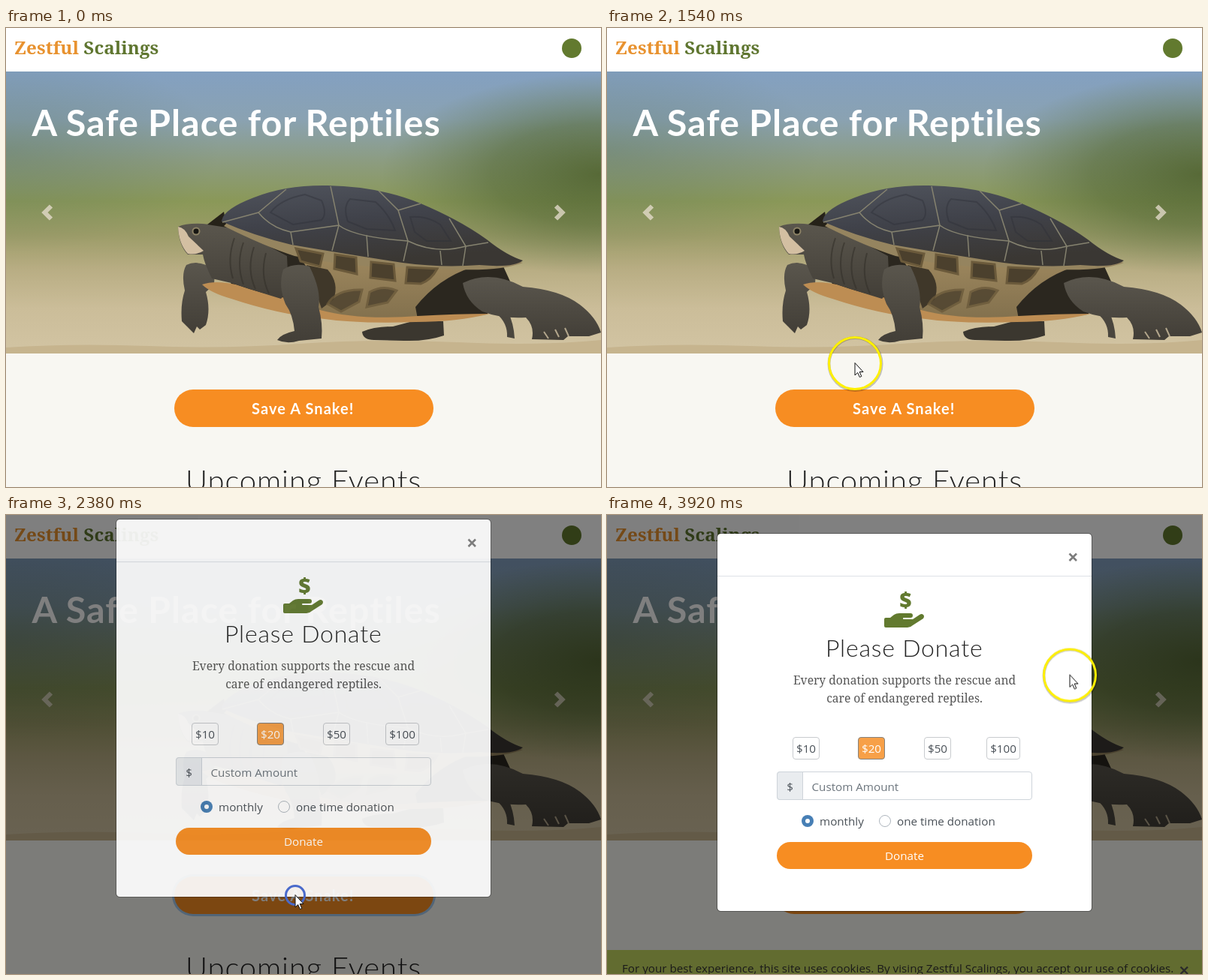
These frames come from a looping animation (792x612 px, 3980 ms). An HTML page:

```html
<!DOCTYPE html>
<html lang="en">
<head>
<meta charset="utf-8">
<title>Donation dialog</title>
<style>
html, body { margin: 0; width: 100%; height: 100%; overflow: hidden; background: #f8f7f2; }
svg { display: block; width: 792px; height: 612px; }
text { font: 15.2px "Open Sans", "Noto Sans", sans-serif; fill: #495057; }
.mid { text-anchor: middle; }
.brand { font: 700 24.2px "Noto Serif", serif; fill: #e8922f; }
.brand .alt { fill: #5f7630; }
.hero { font: 700 48.5px Lato, sans-serif; letter-spacing: 1px; word-spacing: -.6px; fill: #fff; }
.cta { font: 700 20px Lato, sans-serif; letter-spacing: 1.07px; fill: #fff; }
.light { font: 300 32px Lato, sans-serif; letter-spacing: .8px; fill: #222; }
.light.big { font-size: 40px; letter-spacing: .9px; }
.serif { font: 15.6px "Noto Serif", serif; fill: #555; }
.white { fill: #fff; }

.step { animation: 3.98s step-end infinite; }
#pointer { animation-name: move; }
#halo { animation-name: halo; }
#arrow { animation-name: arrow; }
#hand { animation-name: hand; }
#click { animation-name: click; }
#button { animation-name: hover; }
#focus { animation-name: focus; }
#shade { animation-name: shade; }
#modal { animation-name: modal; }
#cookies { animation-name: cookies; }

@keyframes move {
  0% { transform: translate(-80px, 160px); }
  21.1% { transform: translate(37px, 196px); }
  24.62% { transform: translate(88px, 230px); }
  28.14% { transform: translate(153px, 271px); }
  31.65% { transform: translate(219px, 330px); }
  35.17% { transform: translate(281px, 396px); }
  38.69% { transform: translate(330px, 447px); }
  42.21% { transform: translate(364px, 480px); }
  45.72% { transform: translate(385px, 507px); }
  91.45% { transform: translate(391px, 500px); }
  94.97% { transform: translate(497px, 366px); }
  98.49%, 100% { transform: translate(616px, 213.5px); }
}
@keyframes halo {
  0% { opacity: 0; }
  21.1% { opacity: 1; }
  52.76% { opacity: 0; }
  91.45%, 100% { opacity: 1; }
}
@keyframes arrow {
  0% { opacity: 0; }
  21.1% { opacity: 1; }
  45.72% { opacity: 0; }
  56.28%, 100% { opacity: 1; }
}
@keyframes hand {
  0% { opacity: 0; }
  45.72% { opacity: 1; }
  56.28%, 100% { opacity: 0; }
}
@keyframes click {
  0% { opacity: 0; r: 9.5px; stroke: #44567c; }
  52.76% { opacity: 1; r: 9.5px; stroke: #44567c; }
  56.28% { opacity: 1; r: 11.5px; stroke: #3f4f9f; }
  59.79% { opacity: 1; r: 12.5px; stroke: #4a6acb; }
  63.31% { opacity: .45; r: 13.5px; stroke: #4a6acb; }
  66.83%, 100% { opacity: 0; r: 13.5px; stroke: #4a6acb; }
}
@keyframes hover {
  0% { fill: #f78d22; }
  45.72% { fill: #de811e; }
  56.28%, 100% { fill: #f78d22; }
}
@keyframes focus {
  0% { opacity: 0; }
  52.76% { opacity: 1; }
  66.83%, 100% { opacity: 0; }
}
@keyframes shade {
  0% { opacity: 0; }
  56.28% { opacity: .39; }
  59.79%, 100% { opacity: .5; }
}
@keyframes modal {
  0% { opacity: 0; transform: translateY(-50px); }
  59.79% { opacity: .92; transform: translateY(-19px); }
  63.31%, 100% { opacity: 1; transform: none; }
}
@keyframes cookies {
  0% { opacity: 0; }
  66.83%, 100% { opacity: 1; }
}
</style>
</head>
<body>
<svg viewBox="0 0 792 612">
  <defs>
    <linearGradient id="sky" x2="0" y2="1">
      <stop offset="0" stop-color="#83a0c1"/>
      <stop offset=".17" stop-color="#8aa2b2"/>
      <stop offset=".32" stop-color="#8c9c80"/>
      <stop offset=".46" stop-color="#8a9858"/>
      <stop offset=".58" stop-color="#9c9c68"/>
      <stop offset=".7" stop-color="#b8ad83"/>
      <stop offset=".84" stop-color="#cbbd99"/>
      <stop offset="1" stop-color="#d2c4a3"/>
    </linearGradient>
    <radialGradient id="dusk" gradientUnits="userSpaceOnUse" cx="0" cy="0" r="1" gradientTransform="translate(790 195) scale(290 135)">
      <stop offset="0" stop-color="#50632f" stop-opacity=".88"/>
      <stop offset=".5" stop-color="#566a38" stop-opacity=".6"/>
      <stop offset="1" stop-color="#62764a" stop-opacity="0"/>
    </radialGradient>
    <radialGradient id="haze" cx="0" cy=".28" r=".36">
      <stop offset="0" stop-color="#56705f" stop-opacity=".35"/>
      <stop offset="1" stop-color="#56705f" stop-opacity="0"/>
    </radialGradient>
    <linearGradient id="shell" x2=".3" y2="1">
      <stop offset="0" stop-color="#50545d"/>
      <stop offset=".5" stop-color="#40424a"/>
      <stop offset="1" stop-color="#3a3733"/>
    </linearGradient>
    <linearGradient id="skin" x2="0" y2="1">
      <stop offset="0" stop-color="#5a564d"/>
      <stop offset="1" stop-color="#423e37"/>
    </linearGradient>
    <linearGradient id="belly" x2="0" y2="1">
      <stop offset="0" stop-color="#a48d62"/>
      <stop offset="1" stop-color="#82704d"/>
    </linearGradient>
    <clipPath id="frame"><path d="M0 58H792V434H0Z"/></clipPath>
  </defs>

  <path fill="#f8f7f2" d="M0 0H792V612H0Z"/>
  <path fill="#fff" d="M0 0H792V58H0Z"/>
  <text class="brand" x="11" y="35">Zestful <tspan class="alt">Scalings</tspan></text>
  <circle cx="753" cy="27" r="13" fill="#627a2f"/>

  <g clip-path="url(#frame)">
    <path fill="url(#sky)" d="M0 58H792V434H0Z"/>
    <path fill="url(#haze)" d="M0 58H792V434H0Z"/>
    <path fill="url(#dusk)" d="M0 58H792V434H0Z"/>
    <path fill="#c6b48e" d="M0 426Q90 420 190 424T390 421T600 419T792 416V434H0Z"/>

    <!-- far limbs and tail -->
    <path fill="#3b372f" d="M474 405Q490 398 515 398L545 390L582 391L583 410Q560 418 530 417L490 416Q475 416 474 405Z"/>
    <path fill="#4a463e" d="M652 380Q668 393 667 412L677 414Q676 394 668 378Z"/>
    <path fill="url(#skin)" d="M240 316Q256 308 278 322L277 342L266 352Q273 376 266 396L258 402L254 398L250 407L241 398L234 391Q232 368 238 350Q233 328 240 316Z"/>

    <!-- underside -->
    <path fill="#2b271f" d="M290 262L380 285L560 315L662 318L672 340L640 382L540 386L420 380L300 345Z"/>
    <path fill="url(#skin)" d="M608 340Q645 322 688 345Q738 349 764 369Q786 386 792 406L776 411L748 411L742 416L700 415Q704 398 692 386Q660 388 634 378Q612 364 608 340Z"/>
    <path fill="none" stroke="#b3a68c" stroke-width="2" d="M716 405L722 414M731 402L736 412M744 400L749 411"/>
    <path fill="url(#belly)" d="M376 284Q450 300 530 312L620 319Q575 334 545 372L548 388Q480 392 418 385L408 330Z"/>
    <path fill="#3f3729" d="M400 316L428 322Q444 340 436 362L420 374Z"/>
    <path fill="#bd8d53" d="M261 342Q278 336 306 342Q340 354 372 360L418 376Q470 390 548 384Q600 381 644 381Q600 392 545 392Q470 395 416 387Q360 381 300 361Q272 353 261 342Z"/>

    <!-- head and neck -->
    <path fill="url(#skin)" d="M229 265Q240 260 262 261L292 264Q340 285 374 304L376 350L366 361Q330 350 300 340L274 334Q264 314 262 302L242 302Q230 290 229 265Z"/>
    <path fill="#d3bfa2" d="M229 265Q238 266 243 278L263 297Q254 303 242 301Q230 288 229 265Z"/>
    <circle cx="253" cy="271" r="5.500" fill="#8c8266"/>
    <circle cx="253" cy="271" r="3.500" fill="#171612"/>
    <path fill="none" stroke="#34312b" stroke-width="2" opacity=".6" d="M304 280Q294 308 302 334M316 286Q306 314 316 342M330 292Q320 322 332 348M346 300Q338 330 350 354"/>
    <path fill="#262219" d="M268 262L290 245L294 266Z"/>

    <!-- shell -->
    <path fill="#95845f" d="M290 264Q344 291 384 304Q460 320 530 319L600 322Q660 324 688 313L640 300L300 254Z"/>
    <path fill="url(#shell)" d="M287 258Q288 242 330 226Q372 209 428 210Q496 211 552 234Q604 256 640 282Q666 303 688 310Q676 320 630 316Q580 320 528 313Q450 301 380 289Q330 277 287 258Z"/>
    <g fill="none" stroke="#85826f" stroke-width="1.500">
      <path d="M288 259L336 246L373 215M336 246Q352 266 379 272L443 263L432 211M379 272L382 289"/>
      <path d="M443 263L434 297M443 263Q464 279 535 284L522 243L496 217M535 284L529 311M522 243L552 234"/>
      <path d="M535 284Q572 302 612 291L590 254M612 291L608 317M612 291L642 286M480 276L482 305M578 297L580 316"/>
    </g>
    <g fill="none" stroke="#2d2f37" stroke-width="2" opacity=".4">
      <path d="M352 246Q366 228 398 222L420 230Q428 248 420 256L382 262Z"/>
      <path d="M455 258Q448 238 458 228L492 232Q510 248 518 270L480 268Z"/>
      <path d="M544 272L538 252Q560 250 578 262L592 284L560 284Z"/>
    </g>
    <g fill="#4b402d" stroke="#6b5a3b" stroke-width="3">
      <path d="M386 294L422 301L418 318L392 311Z"/>
      <path d="M438 302L466 306L467 328L437 321Z"/>
      <path d="M486 312L516 315L518 337L485 333Z"/>
      <path d="M534 319L574 321Q566 336 552 341L532 340Z"/>
      <path d="M428 368Q440 348 474 349L470 365L446 378Z" opacity=".8"/>
      <path d="M484 352Q502 342 520 350L508 366L480 372Z" opacity=".8"/>
    </g>

    <!-- near front leg -->
    <path fill="url(#skin)" d="M369 322Q384 312 404 318Q420 350 416 372Q422 394 420 414L390 417Q374 422 361 416Q366 408 384 404Q382 382 372 368Q362 344 369 322Z"/>
  </g>

  <text class="hero" x="34.500" y="144">A Safe Place for Reptiles</text>
  <path fill="none" stroke="#e9dfd0" stroke-opacity=".75" stroke-width="6" d="M60 237.500L51.500 246L60 254.500M732 237.500L740.500 246L732 254.500"/>

  <rect id="focus" class="step" x="221" y="479" width="351" height="56" rx="28" fill="#a3c9ee"/>
  <rect id="button" class="step" x="224" y="482" width="345" height="50" rx="25"/>
  <text class="cta" x="327" y="515">Save A Snake!</text>
  <text class="light big" x="239" y="618">Upcoming Events</text>

  <g id="cookies" class="step">
    <path fill="#c4d860" d="M0 580H792V612H0Z"/>
    <text x="20" y="610" style="fill:#333">For your best experience, this site uses cookies. By vising Zestful Scalings, you accept our use of cookies.</text>
    <path stroke="#555" stroke-width="2.400" d="M763.500 602.500L773 612M773 602.500L763.500 612"/>
  </g>
  <path id="shade" class="step" d="M0 0H792V612H0Z"/>

  <g id="modal" class="step">
    <rect x="147" y="25" width="498" height="503" rx="4.500" fill="#fff"/>
    <rect x="146.500" y="24.500" width="499" height="504" rx="4.500" fill="none" stroke="#000" stroke-opacity=".3"/>
    <path stroke="#dee2e6" d="M147 81.500H645"/>
    <path stroke="#7d7d7d" stroke-width="2.600" d="M615.500 51.500L625 61M625 51.500L615.500 61"/>
    <text class="mid" x="397.500" y="124" style="font-size:28px;font-weight:800;fill:#627a2f">$</text>
    <path fill="#627a2f" d="M369 139q0-2 2-2h6l5-4q3-2 7-2h15q3 0 3 3t-3 3h-9q-1 0-1 1t1 1h12l9-6q3-2 5 0t0 5l-14 9q-3 3-7 3h-29q-2 0-2-2z"/>
    <text class="light" x="291" y="189">Please Donate</text>
    <text class="serif mid" x="396" y="226">Every donation supports the rescue and</text>
    <text class="serif mid" x="396" y="250">care of endangered reptiles.</text>

    <g fill="#fff" stroke="#c8cbce">
      <rect x="247.500" y="296.500" width="35" height="29" rx="3.500"/>
      <rect x="334.500" y="296.500" width="35" height="29" rx="3.500" fill="#f7a048" stroke="#85827d"/>
      <rect x="422.500" y="296.500" width="35" height="29" rx="3.500"/>
      <rect x="505.500" y="296.500" width="44" height="29" rx="3.500"/>
      <rect x="226.500" y="342.500" width="339" height="37" rx="3.500" stroke="#ced4da"/>
      <path fill="#e9ecef" stroke="#ced4da" d="M260.500 342.500H230q-3.500 0-3.500 3.500v30q0 3.500 3.500 3.500h30.500z"/>
      <circle cx="370" cy="408" r="7.500" stroke="#adb5bd"/>
    </g>
    <text class="mid" x="265" y="317">$10</text>
    <text class="mid white" x="352" y="317">$20</text>
    <text class="mid" x="440" y="317">$50</text>
    <text class="mid" x="527.500" y="317">$100</text>
    <text class="mid" x="243.500" y="368">$</text>
    <text x="272.500" y="368" style="fill:#6c757d">Custom Amount</text>
    <circle cx="267" cy="408" r="8" fill="#477fb5"/>
    <circle cx="267" cy="408" r="3" fill="#fff"/>
    <text x="283" y="414">monthly</text>
    <text x="386" y="414">one time donation</text>
    <rect x="226" y="436" width="340" height="36" rx="18" fill="#f78d22"/>
    <text class="mid white" x="396" y="460">Donate</text>
  </g>

  <g id="pointer" class="step">
    <g id="halo" class="step" fill="none">
      <circle cx=".5" cy="1" r="35" stroke="#000" stroke-opacity=".22" stroke-width="4"/>
      <circle r="34.500" stroke="#fff000" stroke-width="3"/>
    </g>
    <circle id="click" class="step" r="9.500" fill="none" stroke-width="3"/>
    <path id="arrow" class="step" fill="#fff" stroke="#111" d="M0 -.5V16L3.700 12.500L6.300 18.500L8.800 17.500L6.200 11.500H11Z"/>
    <path id="hand" class="step" fill="#fff" stroke="#111" d="M-1.500 0.500Q0-1 1.500 .5V7Q4 5.500 4.800 7.800Q7 6.500 8 8.800Q10.500 8 10.500 11V15Q10 18 8.500 19V22H-.5V19.500L-5 13Q-5.500 10.500-3.500 11L-1.500 13Z"/>
  </g>
</svg>
</body>
</html>
```
